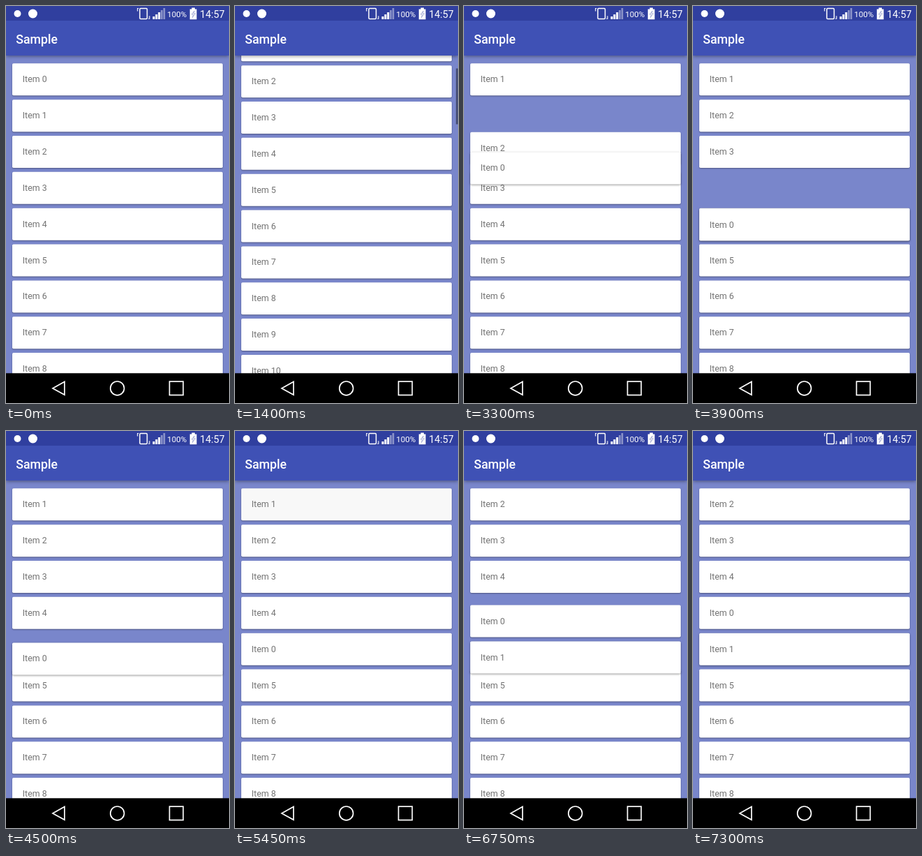
An HTML page that plays this animation: 320 px wide and 569 px high, repeating every 8 s.

```html
<!DOCTYPE html>
<html lang="en">
<head>
<meta charset="utf-8">
<title>Sample list</title>
<style>
html, body { margin: 0; width: 100%; height: 100%; overflow: hidden; background: #7986cb; }
#stage { position: relative; width: 320px; height: 569px; overflow: hidden; background: #7986cb; font-family: Roboto, sans-serif; }
.card {
  position: absolute; left: 9px; top: 0; width: 301.7px; height: 45.6px;
  box-sizing: border-box; padding-left: 14.7px; border-radius: 1.8px;
  background: #fff; color: #737373; font-size: 12.44px; line-height: 46.4px;
  box-shadow: 0 1px 2px rgba(0, 0, 0, .36);
}
.card.lifted { z-index: 1; box-shadow: 0 1px 3px rgba(0, 0, 0, .42); }
#thumb { position: absolute; z-index: 2; right: 0; top: 72px; width: 3.5px; height: 80px; background: #000; }
#bar {
  position: absolute; z-index: 3; left: 0; top: 0; width: 320px; height: 71.2px;
  background: linear-gradient(#303f9f 21.4px, #3f51b5 21.4px);
  box-shadow: 0 1px 5px rgba(0, 0, 0, .42);
}
#chrome { position: absolute; z-index: 4; left: 0; top: 0; }
</style>
</head>
<body>
<div id="stage">
  <div id="list"></div>
  <div id="thumb"></div>
  <div id="bar"></div>
  <svg id="chrome" width="320" height="569" fill="#fff" font-family="Roboto, sans-serif">
    <circle cx="16.5" cy="11" r="5"/>
    <circle cx="38.5" cy="11" r="6.5"/>
    <g fill="none" stroke="#fff">
      <rect x="192" y="3.6" width="10.5" height="14.8" rx="1.2" stroke-width="1.5"/>
      <path d="M190.3 3.5h-1.6v4M204.3 18.2h1.6v-4" stroke-width="1.1"/>
    </g>
    <path d="M210.5 15h3v4h-3zM214.4 12h3v7h-3zM218.3 9h3v10h-3z"/>
    <path d="M222.2 6h2.6v13h-2.6zM225.7 3h2.6v16h-2.6z" opacity=".45"/>
    <text x="231.3" y="15.8" font-size="11.6">100%</text>
    <path d="M266.5 2.5h4.5v2h2.6v14.7h-9.8V4.500h2.700z"/>
    <path d="M270.300 7l-4 5h2.500l-1.300 4.500 4.200-5.700h-2.600z" fill="#fff" stroke="#8a93c8" stroke-width=".7"/>
    <text x="278.300" y="16.500" font-size="14.300">14:57</text>
    <text x="14.200" y="54.200" font-size="17.780" font-weight="500">Sample</text>
    <rect y="526.300" width="320" height="43" fill="#000"/>
    <g fill="none" stroke="#fff" stroke-width="1.700">
      <path d="M84 538.500v18.800L67 547.900z"/>
      <circle cx="159.700" cy="547.900" r="9.900"/>
      <rect x="234.600" y="538.200" width="19.700" height="19.400"/>
    </g>
  </svg>
</div>
<script>
const LOOP = 8000, TOP = 82.3, PITCH = 51.85, COUNT = 50;

// Each path is a list of [time, value] points.
const drags = [
  {
    item: 0,
    path: [[2040, 82.3], [2300, 113], [2650, 136], [3100, 166], [3300, 209.3], [3500, 247],
      [3700, 275], [3900, 290.6], [3950, 291.4], [4150, 301], [4300, 305]],
    release: 4450, slot: 4,
    press: [[1600, 0], [1800, .08], [1950, .08], [2100, 0]],
    swaps: [[1, 2650], [2, 3250], [3, 3460], [4, 3960]]
  },
  {
    item: 1,
    path: [[5950, 82.3], [6050, 104], [6150, 136], [6250, 200], [6350, 238], [6500, 278],
      [6560, 291], [6700, 300], [6900, 306]],
    release: 7060, slot: 4,
    press: [[5400, 0], [5450, .027], [5650, .08], [5850, .08], [6000, 0]],
    swaps: [[2, 6170], [3, 6267], [4, 6365], [0, 6580]]
  }
];
const scrollPath = [[570, 0], [1050, 330], [1100, 330], [1580, 0]];
const thumbFade = [[580, 0], [630, .4], [1850, .4], [2100, 0]];

const list = document.getElementById('list');
const thumb = document.getElementById('thumb');
const cards = Array.from({ length: COUNT }, (_, i) => {
  const card = document.createElement('div');
  card.className = 'card';
  card.textContent = 'Item ' + i;
  return list.appendChild(card);
});

const slotY = slot => TOP + slot * PITCH;
const linear = p => p;
const smooth = p => .5 - .5 * Math.cos(Math.PI * p);
const progress = (t, start, length) => Math.min(1, Math.max(0, (t - start) / length));

function along(path, t, ease = linear) {
  let value = path[0][1];
  for (let i = 1; i < path.length && t > path[i - 1][0]; i++) {
    const [t0, v0] = path[i - 1], [t1, v1] = path[i];
    value = v0 + (v1 - v0) * ease(progress(t, t0, t1 - t0));
  }
  return value;
}

function draw(t) {
  const tops = cards.map((_, i) => slotY(i));
  const scroll = along(scrollPath, t, smooth);
  const shade = cards.map(() => 0);
  let lifted = -1;

  for (const { item, path, release, slot, press, swaps } of drags) {
    shade[item] = Math.max(shade[item], along(press, t));
    for (const [other, start] of swaps) {
      tops[other] -= PITCH * smooth(progress(t, start, 250));
    }
    if (t < path[0][0]) continue;
    const held = along(path, t);
    tops[item] = held + (slotY(slot) - held) * smooth(progress(t, release, 250));
    if (t < release + 250) lifted = item;
  }

  cards.forEach((card, i) => {
    card.style.transform = `translateY(${(tops[i] - scroll).toFixed(2)}px)`;
    const level = Math.round(255 * (1 - shade[i]));
    card.style.backgroundColor = `rgb(${level},${level},${level})`;
    card.classList.toggle('lifted', i === lifted);
  });
  const travel = (454 - 80) / (COUNT * PITCH + 20 - 454);
  thumb.style.transform = `translateY(${scroll * travel}px)`;
  thumb.style.opacity = along(thumbFade, t);
}

function tick() {
  draw(performance.now() % LOOP);
  requestAnimationFrame(tick);
}
tick();
</script>
</body>
</html>
```
